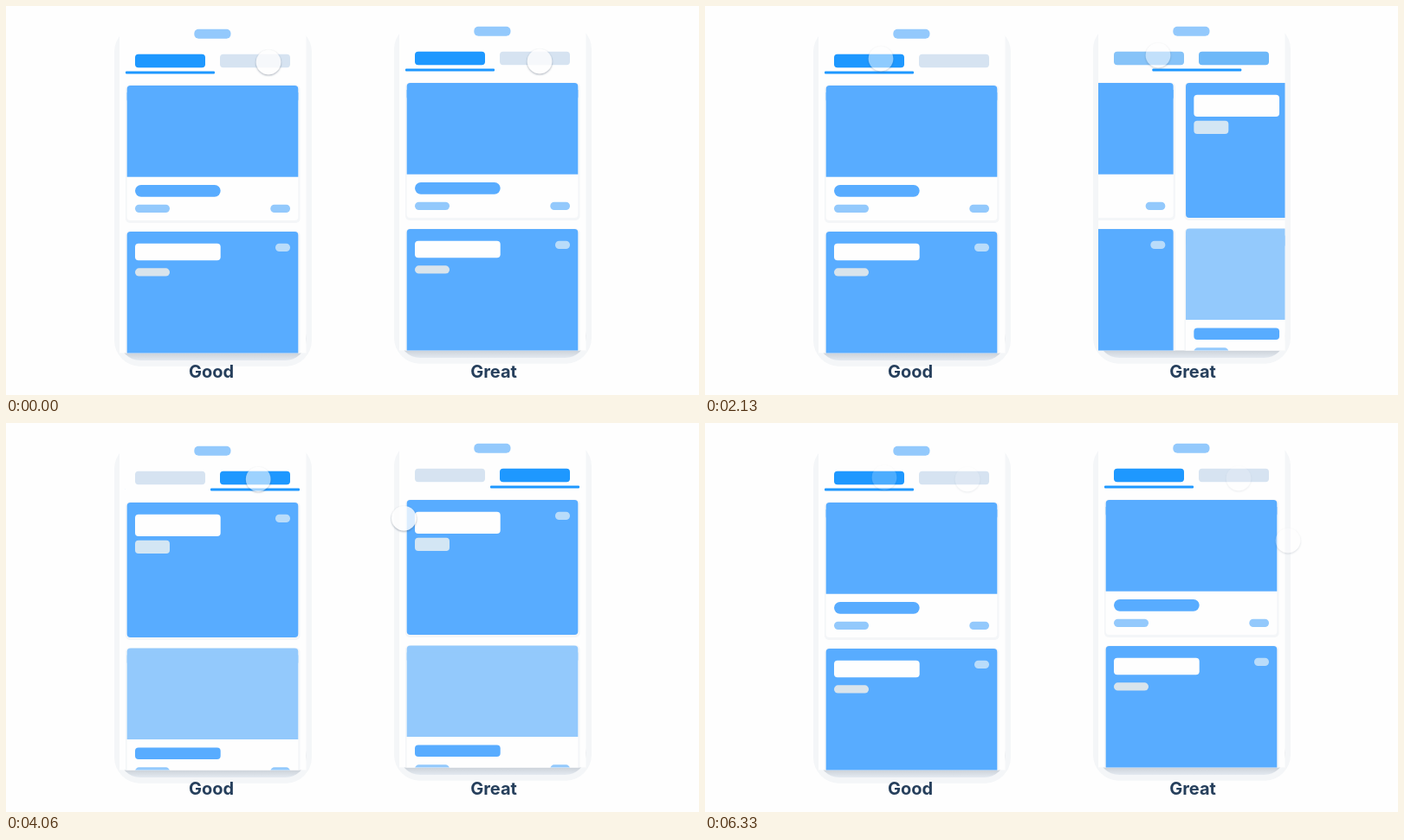
Animation of 800x450 px, one loop 6.4 s. Source, as an HTML page:

```html
<!DOCTYPE html>
<html lang="en">
<head>
<meta charset="utf-8">
<title>Tab transitions: good and great</title>
<style>
  html, body { margin: 0; width: 100%; height: 100%; overflow: hidden; background: #fefefe; }
  svg { display: block; width: 800px; height: 450px; }
  text { font: 700 20px Inter, "Open Sans", sans-serif; fill: #263f5c; text-anchor: middle; }
</style>
</head>
<body>
<svg id="stage" viewBox="0 0 800 450" xmlns="http://www.w3.org/2000/svg">
  <defs>
    <clipPath id="screen"><rect x="131" width="215.5" height="401.5"/></clipPath>
    <linearGradient id="shade" gradientUnits="userSpaceOnUse" x1="0" y1="401" x2="0" y2="411">
      <stop offset="0" stop-color="#cbd1d8"/>
      <stop offset="1" stop-color="#e6ecf3"/>
    </linearGradient>
    <filter id="lift" x="-30%" y="-30%" width="160%" height="160%">
      <feDropShadow dx="0" dy="1" stdDeviation=".9" flood-color="#3c4f6b" flood-opacity=".6"/>
    </filter>
  </defs>
</svg>
<script>
const LOOP = 6400, HALF = LOOP / 2, STEP = LOOP / 96;
const PITCH = 212, TAB_GAP = 98, LEFT = 149, RIGHT = 328;
const WHITE = '#fefefe', BLUE = '#58acff', ACTIVE = '#1e98ff', LIGHT = '#93c9fc',
      TAB = '#d6e3f1', PALE = '#d9e4ec', CHIP = '#b9dcfa', EDGE = '#f4f6f8';
const stage = document.getElementById('stage');

function add(parent, tag, attrs = {}) {
  const el = document.createElementNS(stage.namespaceURI, tag);
  for (const key in attrs) el.setAttribute(key, attrs[key]);
  parent.appendChild(el);
  return el;
}
const box = (parent, x, y, width, height, rx, fill) =>
  add(parent, 'rect', { x, y, width, height, rx, fill });

// Bars hang from the left text edge, chips from the right one.
const bar = (parent, y, w, h, fill, r = h / 2) => box(parent, LEFT, y, w, h, r, fill);
const chip = (parent, y, w, fill) => box(parent, RIGHT - w, y, w, 9.3, 4.6, fill);

function card(parent, y, height, fill, imageHeight) {
  box(parent, 138, y - .5, 201.5, height + 3.5, 5, EDGE);
  box(parent, 139.7, y, 197.6, height, 4, imageHeight ? WHITE : fill);
  if (imageHeight) {
    box(parent, 139.7, y, 197.6, 20, 4, fill);
    box(parent, 139.7, y + 8, 197.6, imageHeight - 8, 0, fill);
  }
}

function firstPage(parent) {
  const g = add(parent, 'g');
  card(g, 92, 156, BLUE, 105.7);
  bar(g, 207, 98.7, 13.7, BLUE);
  bar(g, 229.7, 40, 9.3, LIGHT);
  chip(g, 229.7, 22.7, LIGHT);
  card(g, 261, 156, BLUE);
  bar(g, 274.7, 98.7, 19.6, WHITE, 4);
  bar(g, 303.3, 40, 9.3, PALE);
  chip(g, 274.7, 17, CHIP);
  return g;
}

function secondPage(parent) {
  const g = add(parent, 'g');
  card(g, 92, 156, BLUE);
  bar(g, 105.7, 98.7, 25.3, WHITE, 4);
  bar(g, 135.7, 40, 15.3, '#d3e6f4', 4);
  chip(g, 105.7, 17, CHIP);
  card(g, 260.5, 156, LIGHT, 105.5);
  bar(g, 375.5, 98.7, 13.5, BLUE, 4);
  bar(g, 398.3, 40, 9.3, LIGHT);
  chip(g, 398.3, 22.7, LIGHT);
  return g;
}

function phone(dx, dy) {
  const g = add(stage, 'g', { transform: `translate(${dx} ${dy})` });
  box(g, 125, 23, 228, 393.7, 30, EDGE);
  box(g, 131, 360, 215.5, 50, 24, 'url(#shade)');
  box(g, 131, 0, 215.5, 401.5, 0, WHITE);
  box(g, 217.3, 26.7, 42.2, 11, 5, LIGHT);
  const view = add(g, 'g', { 'clip-path': 'url(#screen)' });
  const pages = [firstPage(view), secondPage(view)];
  const tab = (i, fill) => box(g, LEFT + i * TAB_GAP, 55.7, 81, 15.5, 4, fill);
  const tabs = [0, 1].map(i => (tab(i, TAB), tab(i, ACTIVE)));
  const lines = [0, 1].map(i => box(g, 138 + i * TAB_GAP, 75.4, 103, 3, 1, ACTIVE));
  return { pages, tabs, lines };
}

function finger() {
  const g = add(stage, 'g');
  add(g, 'circle', { r: 14.3, fill: WHITE, filter: 'url(#lift)' });
  return g;
}

const good = phone(0, 0), great = phone(323, -3);
const label = (x, word) => add(stage, 'text', { x, y: 429.5 }).textContent = word;
label(237, 'Good');
label(563, 'Great');

const linear = p => p;
const inOut = p => p < .5 ? 2 * p * p : 1 - 2 * (1 - p) * (1 - p);
const ramp = (t, start, dur, ease = inOut) =>
  ease(Math.min(1, Math.max(0, (t - start) / dur)));

// Goes 0 to 1 at the first time, back to 0 at the second, and so on.
const toggle = (t, times, dur, ease) =>
  times.reduce((sum, at, i) => sum + (i % 2 ? -1 : 1) * ramp(t, at, dur, ease), 0);

const GLIDE = 960, SWIPE = 335, FADE = 175, PRESS = 200;
const rest = [740, 2370, 4000];               // the hand moves on
const taps = [145, 1957, 145 + HALF, 1957 + HALF];
const slides = [200, 1977, 3395, 5262];       // two taps, then two swipes

const early = taps.map(at => at - 50);
const hands = [
  {
    from: [303, 65],
    moves: [
      { at: rest[0], to: [203, 61], lift: 6 },
      { at: rest[1], to: [292, 65] },
      { at: rest[2], to: [207, 63] }
    ],
    presses: early.flatMap((at, i) => i < 3 ? [at, rest[i]] : [at])
  },
  {
    from: [616, 64],
    moves: [
      { at: rest[0] + 110, to: [523, 57] },
      { at: rest[1], to: [631, 129] },
      { at: slides[2], to: [459, 110], dur: SWIPE },
      { at: rest[2], to: [497, 129] },
      { at: slides[3], to: [673, 136], dur: SWIPE }
    ],
    presses: early.slice(0, 2).flatMap((at, i) => [at, rest[i]])
  }
].map(hand => ({ ...hand, now: finger(), next: finger() }));

function place(hand, t) {
  let [x, y] = hand.from;
  for (const { at, to, dur = GLIDE, lift = 0 } of hand.moves) {
    const p = ramp(t, at, dur);
    x += (to[0] - x) * p;
    y += (to[1] - y) * p - 4 * lift * p * (1 - p);
  }
  return [x, y];
}

function show(el, [x, y], opacity) {
  el.setAttribute('transform', `translate(${x} ${y})`);
  el.setAttribute('opacity', opacity);
}

function drawHand(hand, t) {
  const touch = .8 - .3 * toggle(t, hand.presses, PRESS);
  show(hand.now, place(hand, t), touch * (1 - ramp(t, 6100, 400, linear)));
  show(hand.next, hand.from, .8 * ramp(t, 6300, 100));
}

function drawTabs(tabs, pos) {
  tabs[0].setAttribute('opacity', 1 - pos);
  tabs[1].setAttribute('opacity', pos);
}

function draw(t) {
  const mix = toggle(t, taps, FADE, linear);
  const shown = taps.filter(at => t >= at).length % 2;
  drawTabs(good.tabs, mix);
  good.pages.forEach((page, i) => page.setAttribute('display', i === shown ? 'inline' : 'none'));
  good.lines.forEach((line, i) =>
    line.setAttribute('opacity', i === shown ? 1 : i ? mix : 1 - mix));

  const pos = toggle(t, slides, SWIPE);
  drawTabs(great.tabs, pos);
  great.pages.forEach((page, i) =>
    page.setAttribute('transform', `translate(${(i - pos) * PITCH} 0)`));
  great.lines[0].setAttribute('transform', `translate(${pos * TAB_GAP} 0)`);
  great.lines[1].setAttribute('display', 'none');

  hands.forEach(hand => drawHand(hand, t));
}

const start = performance.now();
function tick() {
  const t = Math.max(0, performance.now() - start) % LOOP;
  draw(Math.floor((t + 8) / STEP) * STEP % LOOP);
  requestAnimationFrame(tick);
}
tick();
</script>
</body>
</html>
```
